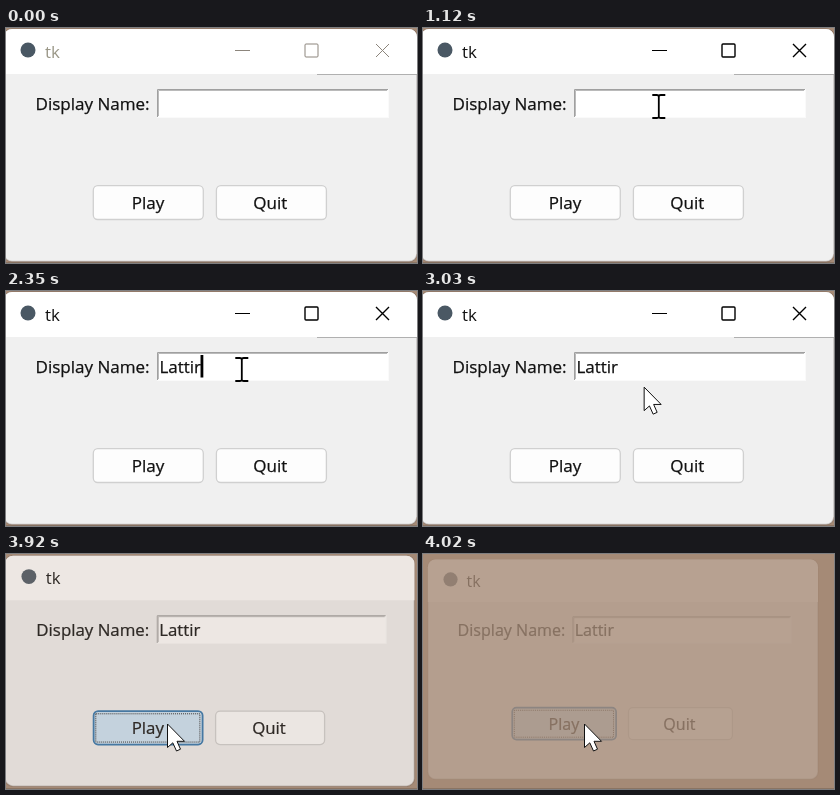
Recreate the animation shown at these times as an HTML page. Size 411 by 235 pixels, loop 4050 ms.

```html
<!DOCTYPE html>
<html lang="en">
<head>
<meta charset="utf-8">
<title>tk</title>
<style>
  html, body { margin: 0; width: 100%; height: 100%; overflow: hidden; background: #a58a76; }
  svg { display: block; width: 100vw; height: 100vh; }
  text { font: 17px "Open Sans", "Noto Sans", sans-serif; fill: #111; white-space: pre; }
  .label { stroke: #111; stroke-width: .25px; }
</style>
</head>
<body>
<svg viewBox="0 0 411 235" preserveAspectRatio="none">
  <rect width="411" height="235" fill="#a58a76"/>
  <rect y="234" width="411" height="1" fill="#8a7463"/>

  <g id="win">
    <rect x="-2" y="1" width="413" height="232.5" rx="8" fill="#f0f0f0" stroke="#4a3a30" stroke-opacity=".25" stroke-width="1.5"/>
    <path d="M-2 46V9a8 8 0 0 1 8-8H403a8 8 0 0 1 8 8V46Z" fill="#fff"/>
    <path id="rule" d="M311 46.5H411" stroke="#b0b0b0"/>
    <circle cx="22" cy="22" r="7.5" fill="#4a5864"/>
    <text id="title" x="39" y="29.5">tk</text>
    <g id="caption" fill="none">
      <path d="M229 22.5H244" stroke-width="1"/>
      <rect x="299" y="16" width="13" height="13" rx="1"/>
      <path d="M370 16L383 29M383 16L370 29"/>
    </g>

    <text class="label" x="29.5" y="82">Display Name:</text>
    <rect x="151" y="61" width="232" height="29" fill="#fafafa"/>
    <rect x="153" y="63" width="229" height="26" fill="#fff"/>
    <path d="M151.5 89V61.5H382" fill="none" stroke="#a0a0a0"/>
    <path d="M152.5 88V62.5H381" fill="none" stroke="#a0a0a0" stroke-opacity=".7"/>
    <text class="label" id="entry" x="153.5" y="82"></text>
    <rect id="caret" y="64" width="2.8" height="22.5" fill="#000"/>

    <rect id="play" x="87.3" y="157.7" width="110" height="33.8" rx="4.5"/>
    <rect id="focus" x="89.5" y="160.5" width="105" height="28.5" fill="none" stroke="#222" stroke-dasharray="1 1"/>
    <text class="label" x="125.7" y="181">Play</text>
    <rect x="210.4" y="157.7" width="110" height="33.8" rx="4.5" fill="#fdfdfd" stroke="#d0d0d0" stroke-width="1.3"/>
    <text class="label" x="247.3" y="181">Quit</text>
  </g>

  <path id="beam" d="M-6.5 -11H-2Q0 -11 0 -9.5Q0 -11 2 -11H6.5M0 -10V11M-6.5 12H-2Q0 12 0 10.5Q0 12 2 12H6.5" fill="none" stroke="#000" stroke-width="1.8"/>
  <path id="arrow" d="M0 0V23.5L5.3 18.8L9 27L13 25.2L9.5 17.3H17Z" fill="#fff" stroke="#111" stroke-linejoin="round"/>
</svg>
<script>
const $ = id => document.getElementById(id);
const LOOP = 4050, ACTIVE = 520, PRESS = 3770;
const NAME = "Lattir";
const KEYS = [1660, 1890, 1980, 2060, 2210, 2350];
const CLOSING = [3890, 3920, 3960, 3990, 4020];
const FIELD = [235.8, 78], PLAY = [161.5, 170], ENTER = [412, 209];

const clamp = v => Math.min(1, Math.max(0, v));
const ease = v => v * v * (3 - 2 * v);
const part = (t, a, b) => clamp((t - a) / (b - a));
const mix = (a, b, k) => a.map((v, i) => v + (b[i] - v) * k);
const rgb = c => `rgb(${c.map(Math.round)})`;
const set = (id, attrs) => {
  for (const k in attrs) $(id).setAttribute(k, attrs[k]);
};
const show = (id, on) => set(id, { visibility: on ? "visible" : "hidden" });

function drawTitle(t, closing) {
  const on = t >= ACTIVE;
  set("title", { style: `fill:${on ? "#111" : "#999686"}` });
  set("caption", { stroke: on ? "#000" : "#8c857c", "stroke-width": on ? 1.4 : 1 });
  show("caption", !closing);
  show("rule", !closing);
}

function drawEntry(t) {
  const count = KEYS.filter(k => t >= k).length;
  const entry = $("entry");
  entry.textContent = NAME.slice(0, count);
  const width = count ? entry.getComputedTextLength() : 0;
  const blinkOff = (t >= 1120 && t < 1430) || (t >= 2950 && t < 3250);
  set("caret", { x: 153 + width });
  show("caret", t >= ACTIVE && t < PRESS && !blinkOff);
}

function drawPlay(t) {
  const pressed = t >= PRESS;
  const k = part(t, 3270, 3400);
  set("play", {
    fill: pressed ? "#cce4f7" : rgb(mix([253, 253, 253], [224, 238, 249], k)),
    stroke: pressed ? "#2f74ad" : rgb(mix([208, 208, 208], [72, 152, 215], k)),
    "stroke-width": 1.3 + 0.5 * k
  });
  show("focus", pressed);
}

function drawPointer(t) {
  const pos = t < 2910
    ? mix(ENTER, FIELD, ease(part(t, 30, 550)))
    : mix(FIELD, PLAY, ease(part(t, 2880, 3410)));
  const inField = pos[1] < 90;
  const move = { transform: `translate(${pos})` };
  set("beam", move);
  set("arrow", move);
  show("beam", t >= 60 && inField);
  show("arrow", t >= 60 && !inField);
}

function drawWindow(step) {
  const shrink = step ? (0.0014 * (step - 3852)) ** 2 : 0;
  set("win", {
    opacity: step ? clamp(0.8 - 0.006 * (step - 3920)) : 1,
    transform: `translate(${122 * shrink} ${84 * shrink}) scale(${1 - shrink})`
  });
}

function draw(t) {
  const step = CLOSING.filter(c => t >= c).pop();
  drawTitle(t, step);
  drawEntry(t);
  drawPlay(t);
  drawPointer(t);
  drawWindow(step);
}

const start = performance.now();
function tick() {
  draw((performance.now() - start) % LOOP);
  requestAnimationFrame(tick);
}
tick();
</script>
</body>
</html>
```
